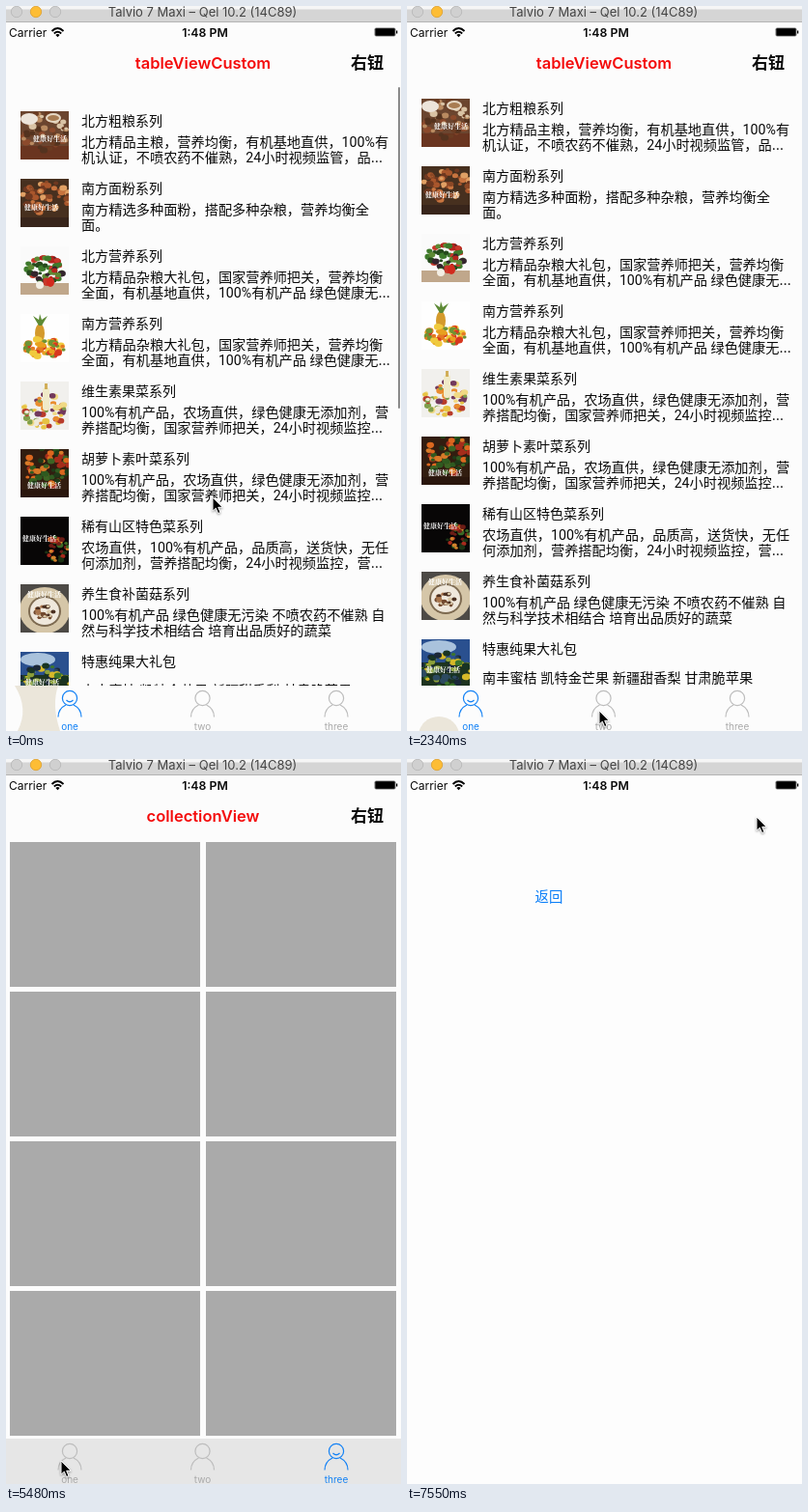
These frames come from a looping animation (409x751 px, 7.99 s). An HTML page:

```html
<!DOCTYPE html>
<html lang="zh-CN">
<head>
<meta charset="utf-8">
<title>Table and collection views</title>
<style>
html, body { margin: 0; width: 100%; height: 100%; overflow: hidden; background: #fcfcfc; }
svg { display: block; width: 100%; height: 100%; }
text { font-family: Inter, "Noto Sans CJK SC", "Noto Sans CJK", sans-serif; fill: #0a0a0a; }
.mid { text-anchor: middle; }
.window { font-size: 13px; fill: #444; }
.status { font-size: 12px; }
.clock { font-size: 12.3px; font-weight: 600; }
.heading { font-size: 16.5px; font-weight: 600; fill: #f40b0b; }
.button { font-size: 17px; font-weight: 700; }
.name { font-size: 14px; }
.info { font-family: Roboto, "Noto Sans CJK SC", "Noto Sans CJK", sans-serif; font-size: 14.2px; }
.dots { font-family: Inter, sans-serif; }
.caption { font-family: "Noto Serif CJK SC", "Noto Sans CJK SC", serif; font-size: 7px; font-weight: 700; fill: #fff; }
.cell { font-size: 16.5px; }
.serif { font-family: "Liberation Serif", serif; font-size: 18px; font-weight: 700; fill: #0a7bf5; }
.back { font-size: 14.4px; fill: #087df8; }
.label { font-size: 10px; fill: #aaa; }
.person { fill: none; stroke: #bdbdbd; stroke-width: 1.2; }
.smile { display: none; }
.on .person { stroke: #1482f5; }
.on .label { fill: #1482f5; }
.on .smile { display: inline; }
.cells .person { stroke: #8c8c8c; }
</style>
</head>
<body>
<svg id="stage" viewBox="0 0 409 751" preserveAspectRatio="none"></svg>
<script>
const LOOP = 7990;
const WHITE = '#fcfcfc';

const rect = (x, y, w, h, fill, more = '') =>
  `<rect x="${x}" y="${y}" width="${w}" height="${h}" fill="${fill}" ${more}/>`;
const oval = (x, y, rx, ry, fill, more = '') =>
  `<ellipse cx="${x}" cy="${y}" rx="${rx}" ry="${ry}" fill="${fill}" ${more}/>`;
const text = (x, y, cls, str) => `<text x="${x}" y="${y}" class="${cls}">${str}</text>`;
const group = (id, body, more = '') => `<g id="${id}" ${more}>${body}</g>`;
const at = (x, y, body) => `<g transform="translate(${x} ${y})">${body}</g>`;
const times = (n, make) => Array.from({ length: n }, (_, i) => make(i)).join('');

function seeded(seed) {
  return () => (seed = (seed * 16807) % 2147483647) / 2147483647;
}

// A heap of food: overlapping blobs inside an oval area.
function heap(colors, [cx, cy, rx, ry], count, size, seed) {
  const random = seeded(seed * 7919 + 13);
  return times(count, i => {
    const angle = random() * 2 * Math.PI, far = Math.sqrt(random());
    const r = size * (0.6 + random() * 0.7);
    return oval((cx + Math.cos(angle) * far * rx).toFixed(1), (cy + Math.sin(angle) * far * ry).toFixed(1),
      r.toFixed(1), (r * 0.8).toFixed(1), colors[i % colors.length]);
  });
}

const photo = ({ back, colors, area, count = 60, size = 3.2, under = '', over = '', caption }, seed) =>
  rect(0, 0, 50, 50, back) + under + heap(colors.split(' '), area, count, size, seed + 1) + over +
  (caption ? text(caption[0], caption[1], 'caption', '健康好生活') : '');

const firstPhotos = [
  { back: '#6b452f', colors: '#b98a60 #54331f #8c4a2c #d9c3a5 #6b3c22', area: [25, 21, 24, 20],
    under: rect(0, 36, 50, 14, '#6a3520'),
    over: oval(9, 8, 9, 6, '#ece4da') + oval(34, 7, 8, 5, '#e6d8c4') + oval(34, 7, 6, 3, '#a87c52'), caption: [13, 31] },
  { back: '#47301f', colors: '#c8743f #a9562c #e0a064 #6e3820 #8c4826', area: [27, 19, 25, 17],
    over: rect(0, 40, 50, 10, '#38251b'), caption: [4, 32] },
  { back: '#fafafa', colors: '#b4241c #3e7a2b #264a1c #c8382a #33242c #5d8a34', area: [25, 25, 20, 14],
    under: rect(0, 38, 50, 12, '#c0a78b'), over: oval(20, 40, 4, 4, '#f3eee4') + oval(31, 37, 4, 5, '#d22a1e') },
  { back: '#fefefe', colors: '#e8a020 #d8381f #f0ca3e #6e9434 #e57a22', area: [25, 35, 21, 10],
    under: oval(20, 20, 5, 10, '#d49a2c') + '<path d="M19 12 13 2l6 4 1-6 2 6 6-4-6 10z" fill="#5d8a35"/>' },
  { back: '#f1f0ed', colors: '#e6c343 #b83b2a #7f9f4c #72395c #e98c2e #f0d984 #eee9d8', area: [25, 30, 22, 18],
    over: rect(23, 6, 7, 24, '#f0eac8', 'rx="3"') + rect(25, 2, 3, 6, '#d1ae58') },
  { back: '#321d10', colors: '#dc681f #3c6424 #a52d1b #d87a28 #2f5a20 #1f3a18', area: [27, 19, 24, 20],
    over: rect(0, 42, 50, 8, '#2a160d'), caption: [7, 40] },
  { back: '#080606', colors: '#a82a1d #3b6a26 #d2822c #6d1d16 #1d3315', area: [38, 33, 12, 13], count: 32, size: 2.8,
    caption: [2, 25] },
  { back: '#4d4a46', colors: '#71492f #a8754d #d9c8a8 #4a2f20', area: [25, 29, 9, 8], count: 24, size: 2.4,
    under: oval(25, 27, 26, 24, '#d5c6a8') + oval(25, 28, 17, 16, '#7d6a50') + oval(25, 28, 15, 14, '#efe8dc'),
    caption: [7, 13] },
  { back: '#2a508f', colors: '#d7b929 #3d762d #183423 #8ca03a #1a2838 #2c4a60', area: [25, 32, 26, 18],
    under: oval(18, 8, 18, 7, '#a9c2dc') + rect(0, 24, 50, 26, '#1d331f'), caption: [5, 34] }
];

const laterPhotos = {
  0: { back: '#2b2a33', colors: '#8c2a1d #5b4a3a #4d6b2c #b99050 #3a2440 #25222a', area: [34, 28, 16, 24],
    caption: [3, 24] },
  1: { back: '#6b5038', colors: '#e1c59c #b88a57 #d8bd90 #8b603a #eee0c4', area: [28, 20, 22, 18],
    size: 4.5, caption: [4, 36] },
  2: { back: '#84866a', colors: '#a9a98a #b4b090 #6d7054 #8c8a68', area: [25, 25, 26, 26],
    over: '<path d="M-2 14 40 52M8-4 54 38M52 4 12 52M34-2-4 40" stroke="#dedbc8" stroke-width="3"/>', caption: [8, 32] },
  3: { back: '#23170f', colors: '#45702a #93301f #cfc4b0 #38552a #3a2418', area: [24, 26, 23, 12],
    over: oval(21, 38, 13, 6, '#f0ece2') + oval(38, 40, 8, 5, '#ded5c4'), caption: [17, 17] },
  4: { back: '#99988b', colors: '#5f9136 #78a744 #a74327 #3b682a #6f8a3c', area: [32, 33, 18, 17],
    under: rect(3, 2, 15, 42, '#d3d4cb') + rect(23, 0, 12, 18, '#c6c8bc'), caption: [3, 21] },
  8: { back: '#243b2a', colors: '#d5b52a #517f31 #182d20 #9fa744 #55412d #23405a', area: [26, 30, 25, 20],
    caption: [4, 32] }
};

const mixed = '北方精品杂粮大礼包，国家营养师把关，营养均衡|全面，有机基地直供，100%有机产品 绿色健康无…';
const organic = '100%有机产品，农场直供，绿色健康无添加剂，营|养搭配均衡，国家营养师把关，24小时视频监控…';
const goods = [
  ['北方粗粮系列', '北方精品主粮，营养均衡，有机基地直供，100%有|机认证，不喷农药不催熟，24小时视频监管，品…'],
  ['南方面粉系列', '南方精选多种面粉，搭配多种杂粮，营养均衡全|面。'],
  ['北方营养系列', mixed],
  ['南方营养系列', mixed],
  ['维生素果菜系列', organic],
  ['胡萝卜素叶菜系列', organic],
  ['稀有山区特色菜系列', '农场直供，100%有机产品，品质高，送货快，无任|何添加剂，营养搭配均衡，24小时视频监控，营…'],
  ['养生食补菌菇系列', '100%有机产品 绿色健康无污染 不喷农药不催熟 自|然与科学技术相结合 培育出品质好的蔬菜'],
  ['特惠纯果大礼包', '南丰蜜桔 凯特金芒果 新疆甜香梨 甘肃脆苹果']
];

const thumb = (spec, i) => at(15, 96 + i * 70, `<g clip-path="url(#square)">${photo(spec, i)}</g>`);

const goodsRow = ([name, info], i) => {
  const lines = info.replace('…', '<tspan class="dots">…</tspan>').split('|');
  return at(78, 96 + i * 70, text(0, 15, 'name', name) +
    lines.map((line, k) => text(0, 45 + (k - (lines.length - 1) / 2) * 16, 'info', line)).join(''));
};

const person = `<g class="person"><circle cy="13" r="7.6"/>
  <path d="M-12 32.5C-12 25-7 21.5-4 20M12 32.5C12 25 7 21.5 4 20"/>
  <path class="smile" d="M-3.5 15Q0 18.5 3.5 15"/></g>`;

const tab = (label, x) => group('tab-' + label, person + text(0, 46, 'label mid', label),
  `transform="translate(${x} 704)"`);

const heading = str => text(204, 65, 'heading mid', str);

const systemCell = i => at(0, 116 + i * 50, at(29, 5, person) + text(57, 31, 'cell', '系统cell') +
  '<circle cx="360" cy="25" r="10.6" fill="none" stroke="#0a7bf5" stroke-width="1.2"/>' +
  text(360, 31, 'serif mid', 'i') +
  '<path d="M384 19.5l5.5 5.5-5.5 5.5" fill="none" stroke="#c5c5ca" stroke-width="2"/>');

const pageOne = rect(0, 16, 409, 735, WHITE) +
  `<g clip-path="url(#list)">${group('rows', goods.map(goodsRow).join('') + firstPhotos.map(thumb).join('') +
    group('later', Object.entries(laterPhotos).map(([i, spec]) => thumb(spec, +i)).join('')))}</g>` +
  group('plate-wide', '<path d="M9 704H54Q47 724 56 751H12Q24 728 9 704Z" fill="#ebe6da"/>') +
  group('plate-low', oval(33, 756, 21, 20, '#ebe6da')) +
  group('bar', rect(406, 84, 2, 333, '#8a8a8a', 'rx="1"')) + heading('tableViewCustom');

const pageTwo = rect(0, 16, 409, 735, '#efeff4') + rect(0, 16, 409, 36, WHITE) +
  rect(0, 52, 409, 29, '#f8f8f9') + rect(0, 116, 409, 500, '#fff') + rect(0, 704, 409, 47, '#f7f7f8') +
  `<g class="cells">${times(10, systemCell)}</g>` + heading('tableViewSystem');

const pageThree = rect(0, 16, 409, 735, WHITE) + rect(0, 704, 409, 47, '#e6e6e6') +
  times(8, i => rect(4 + (i % 2) * 203, 86 + (i >> 1) * 155, 197, 150, '#aaa')) + heading('collectionView');

const lamp = (x, fill, edge) => `<circle cx="${x}" cy="6" r="5.7" fill="${fill}" stroke="${edge}" stroke-width=".8"/>`;

const titleBar = rect(0, 0, 409, 17, '#d5d5d5') + rect(0, 0, 409, 3.5, '#f6f6f6') + rect(0, 16, 409, 1, '#b4b4b4') +
  lamp(11, '#d0d0d0', '#b5b5b5') + lamp(31, '#fdbd35', '#dc9f2c') + lamp(51, '#d0d0d0', '#b5b5b5') +
  text(203.5, 11, 'window mid', 'Talvio 7 Maxi – Qel 10.2 (14C89)');

const statusBar = text(3, 32, 'status', 'Carrier') + text(206, 32, 'clock mid', '1:48 PM') +
  `<g fill="none" stroke="#000" stroke-width="1.9"><path d="M47.5 26Q53.5 20 59.5 26M49.8 28.5Q53.5 25 57.2 28.5"/></g>
  <path d="M51.4 30Q53.5 28.2 55.6 30L53.5 32.2Z"/>` +
  rect(381.5, 22.5, 22, 9, '#777', 'rx="1.8"') + rect(382.5, 23.2, 20, 7.6, '#000', 'rx="1"') +
  rect(404, 25.5, 1.3, 3, '#000');

document.getElementById('stage').innerHTML = `<defs>
  <clipPath id="square">${rect(0, 0, 50, 50, '#000')}</clipPath>
  <clipPath id="list">${rect(0, 84, 409, 620, '#000')}</clipPath></defs>` +
  group('one', pageOne) + group('two', pageTwo) + group('three', pageThree) +
  tab('one', 66) + tab('two', 203.5) + tab('three', 342) +
  group('action', text(374, 65, 'button mid', '右钮')) +
  group('sheet', rect(0, 16, 409, 735, '#fdfdfd') + text(147, 148, 'back mid', '返回')) +
  titleBar + statusBar +
  group('cursor', `<path d="M0 0V14.2L3.3 11.2 5.6 16.6 8 15.6 5.7 10.3H10.2Z" fill="#000" stroke="#fff"
    stroke-width="1" style="filter:drop-shadow(0 1px 1px #0006)"/>`);

// time, cursor x, cursor y, changes
const steps = [
  [0, 214, 509, { page: 'one', shift: 13, bar: 1, later: 0, sheet: 735, dim: 1 }],
  [390, 215, 512, { shift: -5 }],
  [720, 217, 548, { shift: -2, bar: 0.5 }],
  [870, 219, 598, { shift: 0, bar: 0 }],
  [1010, 221, 645],
  [1160, 222, 680],
  [1300, 222, 695],
  [1450, 215, 714],
  [1600, 206, 727],
  [1750, 201, 731],
  [1890, 200, 731],
  [2340, 199, 730],
  [3240, 199, 730, { page: 'two' }],
  [3690, 240, 729],
  [3840, 310, 728],
  [3990, 341, 728],
  [4740, 341, 728, { page: 'three' }],
  [5180, 290, 730],
  [5330, 150, 731],
  [5480, 57, 727],
  [5780, 57, 727, { page: 'one', later: 1 }],
  [5920, 60, 718],
  [6070, 78, 660],
  [6220, 118, 550],
  [6360, 172, 410],
  [6510, 226, 270],
  [6650, 268, 155],
  [6800, 294, 86],
  [6950, 362, 60],
  [7100, 362, 60, { dim: 0.3 }],
  [7400, 362, 60, { sheet: 260, dim: 1 }],
  [7550, 362, 60, { sheet: 0 }]
];

let state = {};
for (const step of steps) step[3] = state = { ...state, ...step[3] };

const part = id => document.getElementById(id);
const show = (id, visible) => part(id).style.display = visible ? '' : 'none';
const move = (id, x, y) => part(id).setAttribute('transform', `translate(${x} ${y})`);

let current;
function draw(step) {
  const [, x, y, s] = step;
  move('cursor', x, y);
  move('rows', 0, s.shift);
  move('sheet', 0, s.sheet);
  show('sheet', s.sheet < 735);
  show('later', s.later);
  show('plate-wide', s.shift > 0);
  show('plate-low', s.shift <= 0);
  part('bar').style.opacity = s.bar;
  part('action').style.opacity = s.dim;
  for (const page of ['one', 'two', 'three']) {
    show(page, page === s.page);
    part('tab-' + page).classList.toggle('on', page === s.page);
  }
}

const start = performance.now();
function tick() {
  const time = (performance.now() - start) % LOOP;
  const step = steps.findLast(([from]) => from <= time);
  if (step !== current) draw(current = step);
  requestAnimationFrame(tick);
}
tick();
</script>
</body>
</html>
```
